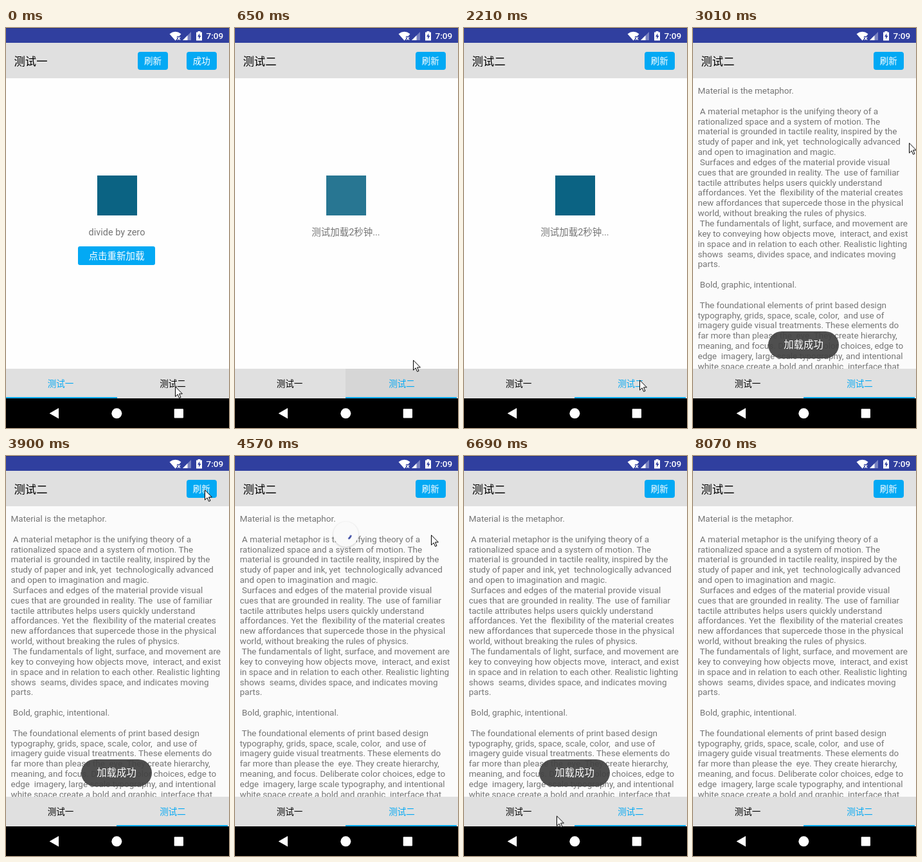
Animation, 347 px wide and 621 px high, one loop 8220 ms. Source, as an HTML page:

```html
<!DOCTYPE html>
<html lang="zh-CN">
<head>
<meta charset="utf-8">
<title>测试</title>
<style>
html, body { margin: 0; width: 100%; height: 100%; overflow: hidden; }
body {
  position: relative; background: #fefefe; color: #000;
  font-family: Roboto, "Noto Sans CJK SC", "Noto Sans CJK", sans-serif;
}
#stage { position: absolute; left: 0; top: 0; width: 347px; height: 621px; overflow: hidden; }
#stage div, #stage svg { position: absolute; }
.anim, .anim-step { animation: 8220ms linear infinite; }
.anim-step { animation-timing-function: step-end; }

.status { width: 347px; height: 23px; background: #303f9f; box-shadow: inset 0 1px #26327f; }
.bar { top: 23px; width: 347px; height: 55px; background: #e0e0e0; }
.title { left: 12.5px; top: 17px; font-size: 17.35px; line-height: 24px; white-space: nowrap; }
.btn {
  top: 14px; width: 46.5px; height: 28px; border-radius: 4px; background: #03a9f4;
  color: #fff; font-size: 13.5px; line-height: 29px; text-align: center;
}
.refresh { left: 205.2px; }
.right { left: 281px; }
.old { animation-name: old; }
.new { animation-name: new; }
.press { animation-name: press; }

.body { top: 78px; width: 347px; height: 451px; overflow: hidden; background: #fefefe; }
.page { width: 347px; height: 451px; }
.first { animation-name: slide-out; }
.second { animation-name: slide-in; }
.loading { animation-name: loading; }
.logo { left: 142px; top: 151px; width: 62px; height: 62px; background: #0b6383; }
.second .logo { animation-name: logo; }
.msg {
  left: 0; top: 230px; width: 345px; text-align: center;
  font-size: 14.46px; line-height: 20px; color: #757575;
}
.reload {
  left: 112px; top: 260.5px; width: 120px; height: 29.5px; border-radius: 3px; background: #03a9f4;
  color: #fff; font-size: 14.46px; line-height: 31px; text-align: center;
}
.content { background: #fbfbfb; animation-name: content; }
.text {
  left: 7.5px; top: 12px; white-space: pre;
  font-size: 13.5px; line-height: 15.84px; color: #757575;
}

.disc {
  left: 152.7px; top: 23.7px; width: 38.6px; height: 38.6px; border-radius: 50%;
  background: #fafafa; box-shadow: 0 1px 3px rgba(0, 0, 0, .22); animation-name: disc;
}
.disc svg { left: 0; top: 0; width: 38.6px; height: 38.6px; animation-name: spin; }
.arc {
  fill: none; stroke: #303f9f; stroke-width: 2.4;
  stroke-dasharray: 1 200; animation-name: arc;
}

.tabs { top: 529px; width: 347px; height: 46px; background: #e0e0e0; }
.tab { top: 0; height: 46px; font-size: 13.5px; line-height: 47px; text-align: center; }
.tab.a { left: 0; width: 170px; animation-name: tab-a; }
.tab.b { left: 172px; width: 175px; animation-name: tab-b; }
.ripple { left: 172px; width: 175px; height: 46px; background: #d6d6d6; animation-name: ripple; }
.line { top: 44px; width: 173px; height: 2px; background: #03a9f4; animation-name: line; }
.nav { top: 575px; width: 347px; height: 46px; background: #000; }
.toast {
  left: 117px; top: 471px; width: 110px; height: 42px; border-radius: 21px;
  background: rgba(66, 66, 66, .93); color: #fff;
  font-size: 15.4px; line-height: 42px; text-align: center; animation-name: toast;
}
.cursor { left: 0; top: 0; width: 14px; height: 20px; animation-name: cursor; }

@keyframes old { 0% { opacity: 1 } 4.38%, 100% { opacity: 0 } }
@keyframes new { 0% { opacity: 0 } 4.38%, 100% { opacity: 1 } }
@keyframes tab-a { 0% { color: #03a9f4 } 4.38%, 100% { color: #000 } }
@keyframes tab-b { 0% { color: #000 } 4.38%, 100% { color: #03a9f4 } }
@keyframes slide-out {
  0%, 4.2% { transform: none; animation-timing-function: ease-out }
  7.3%, 100% { transform: translateX(-347px) }
}
@keyframes slide-in {
  0%, 4.2% { transform: translateX(347px); animation-timing-function: ease-out }
  7.3%, 100% { transform: none }
}
@keyframes line {
  0%, 4.2% { transform: none; animation-timing-function: ease-out }
  7.3%, 100% { transform: translateX(172px) }
}
@keyframes ripple { 0%, 4% { opacity: 0 } 5.5%, 8% { opacity: 1 } 13.99%, 100% { opacity: 0 } }
@keyframes logo { 0%, 7.91% { opacity: .88 } 13.99%, 100% { opacity: 1 } }
@keyframes loading { 0%, 26.89% { opacity: 1 } 31.63%, 100% { opacity: 0 } }
@keyframes content { 0%, 26.89% { opacity: 0 } 31.63%, 100% { opacity: 1 } }
@keyframes press {
  0%, 49.5% { background: #03a9f4 }
  50.2%, 51% { background: #0391d2 }
  53%, 100% { background: #03a9f4 }
}
@keyframes toast {
  0%, 27% { opacity: 0 }
  31.63%, 49.51% { opacity: 1 }
  53.53%, 70.1% { opacity: 0 }
  74.2%, 94.16% { opacity: 1 }
  98.1%, 100% { opacity: 0 }
}
@keyframes disc {
  0%, 50.24% { transform: scale(0) }
  53.5%, 70.1% { transform: none }
  72%, 100% { transform: scale(0) }
}
@keyframes spin {
  0%, 53.89% { transform: rotate(-20deg) }
  72%, 100% { transform: rotate(322deg) }
}
@keyframes arc {
  0%, 53.89% { stroke-dasharray: 1 200; stroke-dashoffset: 0; animation-timing-function: cubic-bezier(.4, 0, .2, 1) }
  62% { stroke-dasharray: 80 200; stroke-dashoffset: 0; animation-timing-function: cubic-bezier(.4, 0, .2, 1) }
  70.1%, 100% { stroke-dasharray: 1 200; stroke-dashoffset: -79 }
}
@keyframes cursor {
  0%, 4.01% { transform: translate(263px, 556px) }
  7.9%, 14.36% { transform: translate(277px, 515px) }
  20.07%, 33.45% { transform: translate(273px, 546px) }
  36.62% { transform: translate(336px, 178px) }
  41.36%, 43.19% { transform: translate(335px, 62px) }
  47.45%, 51% { transform: translate(309px, 52px) }
  55.5%, 69.71% { transform: translate(305px, 122px) }
  79.68% { transform: translate(231px, 462px) }
  81.39% { transform: translate(144px, 558px) }
  86.5%, 92.08% { transform: translate(80px, 610px) }
  92.09%, 92.45% { transform: translate(120px, 610px) }
  92.46%, 100% { transform: translate(120px, 640px) }
}
</style>
</head>
<body>
<div id="stage">
  <div class="body">
    <div class="page first anim">
      <div class="logo"></div>
      <div class="msg">divide by zero</div>
      <div class="reload">点击重新加载</div>
    </div>
    <div class="page second anim">
      <div class="page loading anim">
        <div class="logo anim"></div>
        <div class="msg">测试加载2秒钟...</div>
      </div>
      <div class="page content anim">
        <div class="text">Material is the metaphor.

 A material metaphor is the unifying theory of a
rationalized space and a system of motion. The
material is grounded in tactile reality, inspired by the
study of paper and ink, yet  technologically advanced
and open to imagination and magic.
 Surfaces and edges of the material provide visual
cues that are grounded in reality. The  use of familiar
tactile attributes helps users quickly understand
affordances. Yet the  flexibility of the material creates
new affordances that supercede those in the physical
world, without breaking the rules of physics.
 The fundamentals of light, surface, and movement are
key to conveying how objects move,  interact, and exist
in space and in relation to each other. Realistic lighting
shows  seams, divides space, and indicates moving
parts.

 Bold, graphic, intentional.

 The foundational elements of print based design
typography, grids, space, scale, color,  and use of
imagery guide visual treatments. These elements do
far more than please the  eye. They create hierarchy,
meaning, and focus. Deliberate color choices, edge to
edge  imagery, large scale typography, and intentional
white space create a bold and graphic  interface that</div>
      </div>
      <div class="disc anim">
        <svg class="anim" viewBox="-19.3 -19.3 38.6 38.6">
          <circle class="arc anim" r="8.4" pathLength="100"/>
        </svg>
      </div>
    </div>
  </div>

  <div class="bar">
    <div class="title old anim-step">测试一</div>
    <div class="title new anim-step">测试二</div>
    <div class="btn refresh old anim-step">刷新</div>
    <div class="btn right old anim-step">成功</div>
    <div class="new anim-step"><div class="btn right press anim">刷新</div></div>
  </div>

  <div class="status">
    <svg width="347" height="24" fill="#fff">
      <path d="M254.5 9.2Q263.5 2.4 272.5 9.2L269.6 12.8H266V17L263.5 19.6Z"/>
      <path d="M267 14l4 4.5m0-4.5l-4 4.5" stroke="#fff" stroke-width="1.2"/>
      <path d="M275 19H288V6Z" opacity=".35"/>
      <path d="M275 19H282.5V11.5Z"/>
      <path d="M298.5 6.5V5h4v1.5h2.5V19.5h-9V6.5Z"/>
      <path d="M301.3 8.3L298 13.6h2.2v4l3.2-5.5h-2.1Z" fill="#303f9f"/>
      <text x="311.5" y="17.3" font-size="13.6" font-weight="500">7:09</text>
    </svg>
  </div>

  <div class="tabs">
    <div class="ripple anim"></div>
    <div class="tab a anim-step">测试一</div>
    <div class="tab b anim-step">测试二</div>
    <div class="line anim"></div>
  </div>

  <div class="nav">
    <svg width="347" height="46" fill="#fff">
      <path d="M67.6 23.3L82 15V31.6Z"/>
      <circle cx="172.3" cy="23.3" r="8"/>
      <rect x="261.7" y="16.3" width="14.3" height="14.3" rx="1"/>
    </svg>
  </div>

  <div class="toast anim">加载成功</div>
  <svg class="cursor anim" viewBox="0 0 14 20">
    <path d="M.5 .8V16.2L4.1 12.8L6.6 18.4L9 17.4L6.5 11.9H11.4Z" fill="#fff" stroke="#000"/>
  </svg>
</div>
</body>
</html>
```
